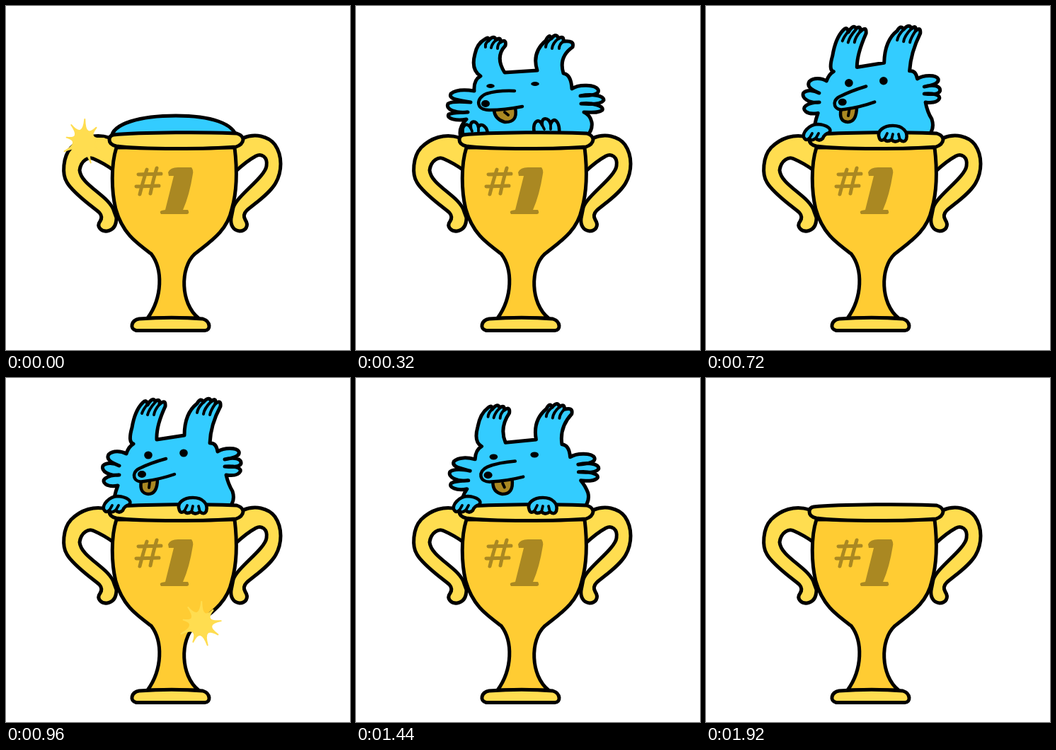
An HTML page with a canvas for the animation above (2.4 s loop, 486x486 px).

```html
<!DOCTYPE html>
<html lang="en">
<head>
<meta charset="utf-8">
<title>Trophy</title>
<style>
html, body { margin: 0; width: 100%; height: 100%; overflow: hidden; background: #fff; }
canvas { display: block; width: 486px; height: 486px; }
</style>
</head>
<body>
<canvas id="stage" width="486" height="486"></canvas>
<script>
const ctx = document.getElementById('stage').getContext('2d');
const BLUE = '#33ccff', GOLD = '#ffcc33', LIGHT = '#ffdd50', BROWN = '#aa8822', INK = '#000';
const STEP = 80, LOOP = 2400;

// Each part holds its squashed and its stretched outline, with matching commands.
const PARTS = {
  body: [
    'M148 186 Q144 172 156 160 C142 163 127 159 131 153 C137 150 147 151 158 150 C141 152 126 146 130 138 C136 134 150 135 162 136 C146 133 130 132 134 124 C141 118 154 118 167 120 Q166 104 176 99 Q162 90 168 68 Q171 53 182 47 Q188 42 187 49 Q195 40 198 48 Q205 43 204 51 Q213 46 211 56 Q196 72 210 94 L256 91 Q248 66 268 49 Q273 38 276 46 Q283 37 286 46 Q294 41 293 50 Q309 48 306 58 Q286 72 293 95 Q304 97 305 117 C315 110 338 111 342 118 C345 125 332 127 317 127 C332 124 350 126 350 133 C347 139 332 139 318 138 C332 136 351 141 348 147 C342 152 332 150 322 150 Q331 154 333 164 Q335 176 324 186 Z',
    'M152 186 Q151 170 158 152 C142 155 134 147 140 142 C145 138 152 137 160 137 C145 139 134 131 137 124 C142 119 152 120 160 124 C148 119 141 115 145 108 C151 102 163 103 170 107 Q173 97 180 93 Q172 91 178 70 Q182 46 193 35 Q199 29 200 38 Q207 26 211 33 Q218 28 217 37 Q226 29 225 40 Q212 68 213 87 L252 81 Q252 50 270 36 Q275 27 279 34 Q287 25 290 33 Q297 27 296 36 Q304 30 303 40 Q289 66 288 92 Q297 91 299 104 C308 98 326 98 329 104 C331 110 322 113 309 115 C322 111 333 114 332 121 C330 126 320 126 309 125 C320 124 333 126 331 132 C328 138 318 138 311 137 Q314 150 320 160 Q325 176 312 186 Z'
  ],
  slits: [
    'M183 58 Q182 53 187 49 M191 59 Q192 53 198 48 M200 60 Q200 54 204 51 M268 58 Q268 52 276 46 M277 60 Q278 52 286 46 M287 60 Q287 54 293 50',
    'M192 50 Q194 44 200 37 M200 52 Q202 44 211 34 M209 52 Q210 45 217 37 M270 49 Q271 42 279 34 M279 51 Q280 43 290 33 M288 52 Q289 46 296 36'
  ],
  tongue: [
    'M195 147 Q196 160 210 164 Q229 165 225 144',
    'M191 146 Q188 163 201 164 Q214 164 214 142'
  ],
  crease: ['M210 150 L215 154', 'M203 147 L202 155'],
  snout: [
    'M224 120 Q200 119 184 124 C169 130 169 147 188 147 Q210 147 235 142',
    'M226 114 Q204 120 188 128 C176 134 180 149 195 146 Q218 143 238 136'
  ]
};

const CUP = {
  left: 'M146 186 C125 179 105 187 92 200 C80 213 79 238 86 249 C95 265 123 284 132 292 Q137 298 133 304 C127 312 135 319 143 318 C154 316 156 306 156 299 L153 291 C147 268 106 254 104 232 C106 218 117 212 124 216 Q138 222 152 232 L166 236 L166 194 Z',
  right: 'M334 187 C352 179 371 184 380 196 C391 212 390 234 381 250 C372 266 350 280 340 289 Q334 295 338 302 C344 311 338 318 330 318 C320 317 317 308 318 300 L321 285 C326 268 366 242 368 226 C370 213 361 208 353 212 Q340 219 324 234 L312 240 L312 194 Z',
  bowl: 'M156 200 C148 225 149 262 155 287 C165 322 185 335 205 350 C222 372 221 412 200 441 L272 441 C246 420 246 370 266 351 C285 335 312 320 319 287 C327 260 326 225 323 200 Z',
  rim: 'M152 182 C190 178 290 178 326 180 Q335 183 335 189 Q334 196 325 199 C290 202 190 203 156 198 Q146 196 146 189 Q146 183 152 182 Z',
  base: 'M188 442 Q235 438.5 278 442 C290 446 289 458.5 281 458.5 L184 458.5 C174 456 177 444 188 442 Z'
};

const DOME = 'M149 186 C150 166 190 155 240 155 C290 155 322 166 326 186 Z';
const PEEK_PAWS = [
  'M152 184 C147 168 157 163 162 172 C160 161 171 161 173 171 C176 164 187 170 186 184',
  'M253 184 C247 162 259 157 263 168 C261 156 273 157 275 167 C278 156 289 160 287 184'
];
const PEEK_TOES = 'M162 172 L164 177 M173 171 L173 177 M263 168 L266 174 M275 167 L275 174';
const GRIP_PAWS = [
  'M139 187 C134 180 146 167 158 167 C171 168 179 174 174 179 Q167 181 165 187 Q160 192 155 187 Q148 192 146 187 Q142 191 139 187 Z',
  'M245 187 C240 176 252 169 264 169 C278 169 286 178 283 188 Q280 194 274 189 Q267 194 262 189 Q255 193 252 188 Q247 192 245 187 Z'
];
const GRIP_TOES = 'M146 187 L150 180 M155 187 L159 180 M252 188 L256 180 M262 189 L264 181 M274 189 L272 181';

const SPARKS = [[0, 110, 191], [12, 275, 347], [21, 331, 180]];
const RAYS = [31, 26, 29, 29, 32, 28, 31, 25, 29];

function shape(d, fill, width = 5) {
  const p = new Path2D(d);
  if (fill) {
    ctx.fillStyle = fill;
    ctx.fill(p);
  }
  ctx.lineWidth = width;
  ctx.strokeStyle = INK;
  ctx.stroke(p);
}

const lerp = (a, b, k) => a + (b - a) * k;

function mix([a, b], k) {
  const to = b.match(/[\d.]+/g);
  let i = 0;
  return a.replace(/[\d.]+/g, n => lerp(+n, +to[i++], k).toFixed(2));
}

function oval(x, y, rx, ry) {
  ctx.fillStyle = INK;
  ctx.beginPath();
  ctx.ellipse(x, y, rx, ry, 0, 0, 7);
  ctx.fill();
}

// Pose per step: kind of view, stretch k, drop below the resting height.
function poseAt(n) {
  if (n === 0) return { dome: true };
  if (n < 4) return { k: 0, drop: [0, 52, 22, 4][n], paws: n > 2 };
  if (n < 6) return { k: n === 4 ? 0 : 0.55, drop: 0, paws: true };
  if (n < 17) return { k: 1 + Math.max(0, Math.min(0.1, (11 - n) * 0.04)), drop: 0, paws: true };
  if (n < 20) return { k: [1.05, 0.4, 0][n - 17], drop: n === 19 ? 38 : 0, paws: true };
  return { paws: n === 20 };
}

function drawBody({ k, drop }) {
  const part = (name, fill, w) => shape(mix(PARTS[name], k), fill, w);
  ctx.save();
  ctx.beginPath();
  ctx.rect(0, 0, 486, 186);
  ctx.clip();
  ctx.translate(0, drop);
  part('body', BLUE);
  part('slits', null, 4);
  part('tongue', BROWN, 4.5);
  part('crease', null, 4);
  part('snout', BLUE, 4.5);
  oval(lerp(183, 192, k), lerp(138, 136, k), 6, 5);
  const ry = lerp(3, 5.5, k);
  oval(lerp(190, 201, k), lerp(113, 109, k), 5.8, ry);
  oval(lerp(253, 251, k), lerp(110, 106, k), 5.8, ry);
  ctx.restore();
}

function drawPaws(paws, toes) {
  paws.forEach(d => shape(d, BLUE, 4.6));
  shape(toes, null, 3.8);
}

function drawLabel() {
  ctx.strokeStyle = ctx.fillStyle = BROWN;
  ctx.lineWidth = 5;
  ctx.stroke(new Path2D('M199 231 Q194 246 189 266 M213 229 Q208 245 204 265 M187 238 L219 237 M184 255 L216 254'));
  ctx.fill(new Path2D('M229 235 Q232 228 243 228 L262 228 Q265 232 264 237 Q259 268 250 288 L257 288 Q260 293 256 294 L219 294 Q216 290 220 289 L225 288 L237 240 L230 240 Z'));
}

function drawSpark(x, y, stage) {
  const tip = (i, r) => {
    const a = i * Math.PI * 2 / RAYS.length - 1.53;
    return [x + Math.cos(a) * r, y + Math.sin(a) * r];
  };
  ctx.fillStyle = ctx.strokeStyle = LIGHT;
  ctx.beginPath();
  if (stage < 2) {
    const s = stage ? 1.3 : 1;
    RAYS.forEach((r, i) => {
      if (!i) ctx.moveTo(...tip(0, r * s));
      ctx.quadraticCurveTo(...tip(i + 0.5, 4 * s), ...tip(i + 1, RAYS[(i + 1) % RAYS.length] * s));
    });
    ctx.fill();
    ctx.lineWidth = 2;
  } else {
    RAYS.forEach((r, i) => {
      ctx.moveTo(...tip(i, r * 0.9));
      ctx.lineTo(...tip(i, r * 1.25));
    });
    ctx.lineWidth = 3.5;
  }
  ctx.stroke();
}

function draw(n) {
  const pose = poseAt(n);
  const grip = pose.k > 0.3;
  ctx.fillStyle = '#fff';
  ctx.fillRect(0, 0, 486, 486);
  ctx.lineCap = ctx.lineJoin = 'round';
  shape(CUP.left, LIGHT);
  shape(CUP.right, LIGHT);
  if (pose.dome) shape(DOME, BLUE);
  if (pose.k !== undefined) drawBody(pose);
  if (pose.paws && !grip) drawPaws(PEEK_PAWS, PEEK_TOES);
  shape(CUP.bowl, GOLD);
  shape(CUP.rim, LIGHT);
  shape(CUP.base, LIGHT);
  drawLabel();
  if (pose.paws && grip) drawPaws(GRIP_PAWS, GRIP_TOES);
  for (const [start, x, y] of SPARKS) {
    if (n >= start && n < start + 3) drawSpark(x, y, n - start);
  }
}

const began = performance.now();
function tick() {
  draw(Math.floor((performance.now() - began) % LOOP / STEP));
  requestAnimationFrame(tick);
}
tick();
</script>
</body>
</html>
```
